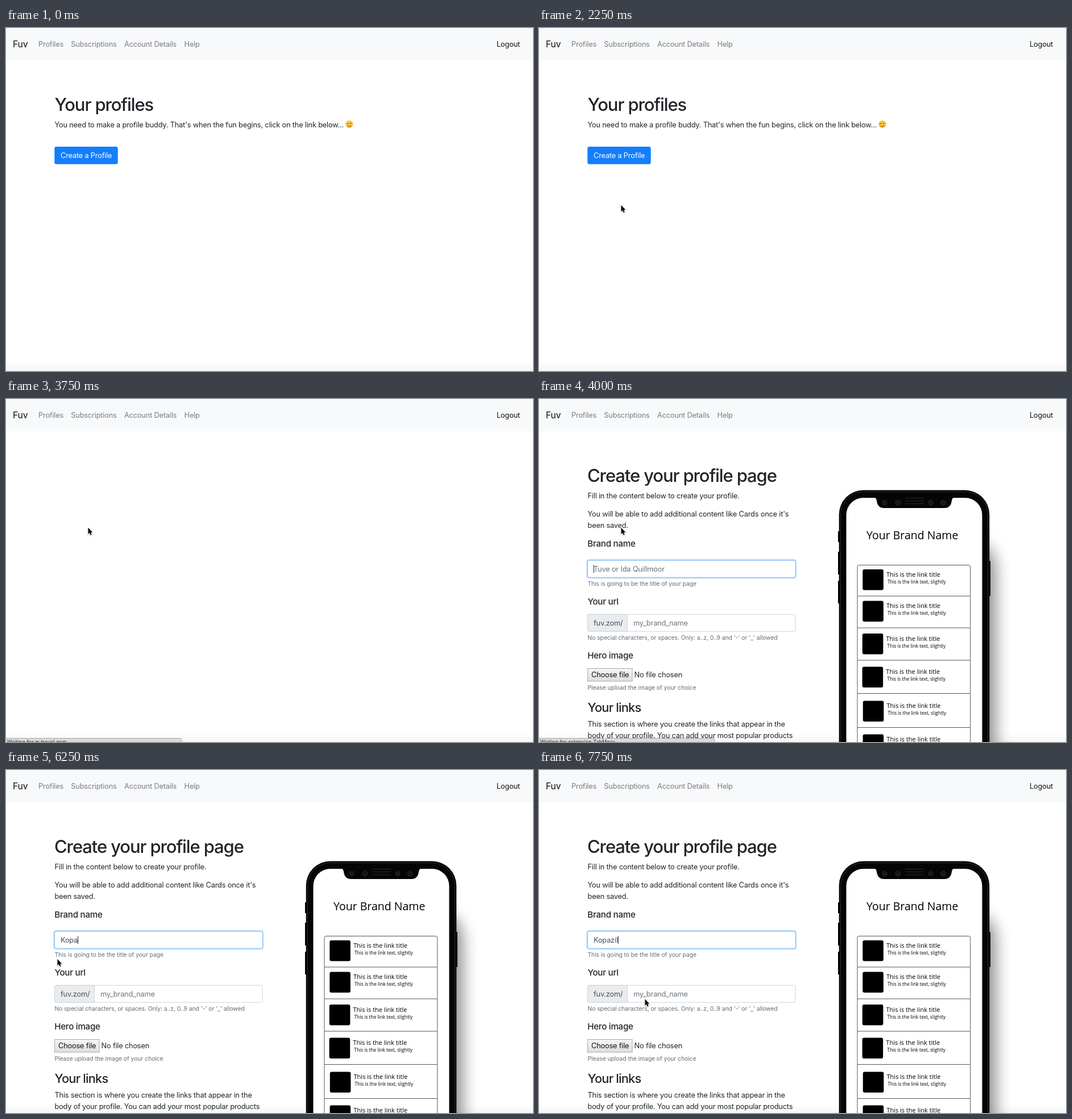
These frames come from a looping animation (927 px wide and 604 px high, 8 s). An HTML page:

```html
<!DOCTYPE html>
<html lang="en">
<head>
<meta charset="utf-8">
<title>Create a profile</title>
<style>
  html, body { margin: 0; width: 100%; height: 100%; overflow: hidden; background: #fff; }
  svg { display: block; width: 927px; height: 604px; }
  text {
    font: 12.8px Inter, sans-serif;
    font-optical-sizing: none;
    letter-spacing: -.0155em;
    fill: #212529;
    white-space: pre;
  }
  .brand { font-size: 15.8px; fill: #111; }
  .nav { fill: #7b7c7d; }
  .dark { fill: #111; }
  .h1 { font-size: 31px; font-weight: 500; letter-spacing: -.036em; }
  .h3 { font-size: 21.8px; font-weight: 500; letter-spacing: -.036em; }
  .label { font-size: 15.2px; font-weight: 500; letter-spacing: -.018em; }
  .hint { font-size: 10.35px; letter-spacing: -.006em; fill: #646c74; }
  .muted { fill: #6c757d; }
  .typed { fill: #495057; }
  .white { fill: #fff; }
  .option { font: bold 10.8px "Liberation Sans", Arial, sans-serif; letter-spacing: 0; fill: #000; }
  .status { font-size: 9.1px; letter-spacing: 0; fill: #222; }
  .mock { font: 11.03px "Open Sans", sans-serif; letter-spacing: 0; fill: #000; }
  .mock.big { font-size: 19.5px; }
  .mock.sub { font-size: 8.3px; }
</style>
</head>
<body>
<svg viewBox="0 0 927 604">
  <defs>
    <linearGradient id="foot" x1="0" y1="0" x2="0" y2="1">
      <stop stop-color="#fff"/><stop offset="1" stop-color="#f5f5f5"/>
    </linearGradient>
    <linearGradient id="grey" x1="0" y1="0" x2="0" y2="1">
      <stop stop-color="#f6f6f6"/><stop offset="1" stop-color="#dedede"/>
    </linearGradient>
    <filter id="soft" x="-30%" y="-30%" width="160%" height="160%">
      <feGaussianBlur stdDeviation="14"/>
    </filter>
    <filter id="drop" x="-60%" y="-60%" width="220%" height="220%">
      <feDropShadow dx="0" dy="1" stdDeviation=".9" flood-opacity=".35"/>
    </filter>
  </defs>

  <rect width="927" height="604" fill="#fff"/>
  <rect width="927" height="57" fill="#f8f9fa"/>
  <rect y="588" width="927" height="16" fill="url(#foot)"/>
  <text class="brand" x="12" y="34">Fuv</text>
  <text class="nav" x="57" y="33">Profiles</text>
  <text class="nav" x="114.3" y="33">Subscriptions</text>
  <text class="nav" x="208" y="33">Account Details</text>
  <text class="nav" x="313.6" y="33">Help</text>
  <text class="dark" x="863" y="33">Logout</text>

  <g id="home">
    <text class="h1" x="85.5" y="146">Your profiles</text>
    <text x="85.5" y="174.5">You need to make a profile buddy. That's when the fun begins, click on the link below...</text>
    <g fill="none" stroke="#6b4208" stroke-linecap="round">
      <circle cx="604" cy="169.5" r="6.3" fill="#fbcb3e" stroke="#e9a82a" stroke-width=".6"/>
      <path d="M600 168.6q1.4-1.5 2.8 0M600.6 172q3.4 3 6.8 0" stroke-width="1"/>
      <ellipse cx="606.4" cy="168" rx=".9" ry="1.2" fill="#6b4208" stroke="none"/>
    </g>
    <rect id="ring" x="83.5" y="207.2" width="115" height="34.4" rx="4.5" fill="#93c3fb"/>
    <rect id="button" x="85.3" y="209" width="111.4" height="30.8" rx="3.2"/>
    <text class="white" x="96" y="229">Create a Profile</text>
  </g>

  <g id="form">
    <text class="h1" x="85" y="146">Create your profile page</text>
    <text x="85.5" y="174.5">Fill in the content below to create your profile.</text>
    <text x="85.5" y="207">You will be able to add additional content like Cards once it's</text>
    <text x="85.5" y="227">been saved.</text>

    <text class="label" x="85.2" y="260">Brand name</text>
    <rect x="83.2" y="281.9" width="370" height="34.6" rx="5" fill="#bfdeff"/>
    <rect x="85.6" y="284.2" width="365.6" height="30" rx="3" fill="#fff" stroke="#80bdff"/>
    <text class="muted" id="hint" x="96" y="304">Tuve or Ida Quillmoor</text>
    <text class="typed" id="typed" x="96" y="304"></text>
    <rect id="caret" y="292.5" width="1" height="13.5" fill="#222"/>
    <text class="hint" x="85.5" y="329">This is going to be the title of your page</text>

    <text class="label" x="85.5" y="361.5">Your url</text>
    <rect x="85.6" y="379.2" width="365.4" height="30" rx="3" fill="#fff" stroke="#ced4da"/>
    <path d="M155.5 379.2H88.6a3 3 0 0 0-3 3v24a3 3 0 0 0 3 3h66.9z" fill="#e9ecef" stroke="#ced4da"/>
    <text class="typed" x="96" y="399">fuv.zom/</text>
    <text class="muted" x="166" y="399">my_brand_name</text>
    <text class="hint" x="85.5" y="424">No special characters, or spaces. Only: a..z, 0..9 and '-' or '_' allowed</text>

    <text class="label" x="85.2" y="457">Hero image</text>
    <rect x="85.5" y="474.5" width="78.5" height="22.5" fill="url(#grey)" stroke="#a9a9a9"/>
    <text class="dark" x="92" y="490">Choose file</text>
    <text x="167.6" y="490">No file chosen</text>
    <text class="hint" x="85.5" y="512">Please upload the image of your choice</text>

    <text class="h3" x="85.5" y="551">Your links</text>
    <text x="85.5" y="577">This section is where you create the links that appear in the</text>
    <text x="85.5" y="596.5">body of your profile. You can add your most popular products</text>

    <g id="phone">
      <rect x="600" y="248" width="203" height="480" rx="50" opacity=".45" filter="url(#soft)"/>
      <path d="M526 233h4v19h-4zM526 269h4v40h-4zM526 320h4v40h-4zM790 285h4v62h-4z"/>
      <rect x="527.7" y="160.5" width="264.6" height="520" rx="43" fill="#050505"/>
      <rect x="530.5" y="163.5" width="259" height="516" rx="40.5" fill="none" stroke="#333" stroke-width=".9"/>
      <rect x="540.5" y="174" width="239" height="500" rx="30" fill="#fff"/>
      <path d="M588 173q5 0 6 6 1.5 13 13 13h106q11.5 0 13-13 1-6 6-6z" fill="#050505"/>
      <g fill="#161616" stroke="#2a2a2a">
        <circle cx="608" cy="182.5" r="4"/><circle cx="631.5" cy="182.5" r="4.5"/>
        <circle cx="689" cy="182.5" r="4"/><circle cx="711" cy="182.5" r="4.5"/>
        <path d="M644 174.5h33M644 179.5h33M644 184.5h33"/>
      </g>
      <text class="mock big" x="576" y="247">Your Brand Name</text>
      <rect x="560" y="292.5" width="198.8" height="340" rx="3" fill="none" stroke="#555"/>
    </g>

    <g id="options">
      <rect x="85.5" y="315.5" width="365.5" height="59" fill="#fff" stroke="#b3bfcc"/>
      <text class="option" x="93" y="330">Kirvo Cosmetics</text>
      <text class="option" x="93" y="349.5">kpkp</text>
      <text class="option" x="93" y="369">Kirvo_Cosmetics</text>
    </g>
  </g>

  <g id="bar">
    <path d="M-1 597.5H306q2.8 0 2.8 3V606H-1z" fill="#dadada" stroke="#a8a8a8"/>
    <text class="status" id="status" x="2" y="606.8"></text>
  </g>

  <path id="cursor" d="M0 0V11.2L2.5 8.9 4.2 12.9 6.1 12.1 4.4 8.2H7.8Z"
    stroke="#fff" stroke-width="1.1" paint-order="stroke" filter="url(#drop)"/>
</svg>
<script>
const $ = id => document.getElementById(id);
const STEP = 250, LOOP = 8000, NAME = 'Kopazil';

// Each row: first step, then the value held from there on.
const pointer = [
  [4, 260, 26], [5, 243, 70], [6, 205, 148], [7, 162, 222], [8, 144.5, 261],
  [9, 144.5, 312], [11, 144.5, 282], [12, 144.5, 235], [13, 144.5, 226.5],
  [17, 139, 240], [18, 121, 278], [19, 100, 317], [20, 90.5, 333],
  [29, 112, 347], [30, 162, 386], [31, 186.5, 403.5]
];
const letters = [[0, 0], [21, 1], [23, 2], [24, 3], [25, 4], [26, 5], [27, 7]];
const messages = [
  [0, ''], [14, 'm.trovel.zom...'], [16, 'extension TabMoss...'],
  [19, 'q.trovel.zom...'], [24, '']
];
// Link rows of the phone: top line, top of the square, sideways shift.
const links = [
  [292.5, 300, 0], [347, 355.5, 0], [403, 413, -.5],
  [460, 471.5, -.7], [518.5, 531.5, .5], [578.5, 590.5, .3]
];
const held = (rows, step) => rows.filter(row => row[0] <= step).pop();
const show = (id, on) => $(id).setAttribute('visibility', on ? 'inherit' : 'hidden');

function add(tag, attrs, label = '') {
  const node = document.createElementNS($('phone').namespaceURI, tag);
  for (const key in attrs) node.setAttribute(key, attrs[key]);
  node.textContent = label;
  $('phone').append(node);
}

for (const [line, y, dx] of links) {
  if (line > 300) add('path', { d: `M560 ${line}H758`, stroke: '#555' });
  add('rect', { x: 569.3 + dx, y, width: 36.6, height: 36.6, rx: 3 });
  add('text', { class: 'mock', x: 611 + dx, y: y + 12.7 }, 'This is the link title');
  add('text', { class: 'mock sub', x: 613 + dx, y: y + 24.9 }, 'This is the link text, slightly');
}

let last = -1;
function draw(step) {
  const spot = held(pointer, step);
  show('cursor', spot);
  if (spot) $('cursor').setAttribute('transform', `translate(${spot[1]} ${spot[2]})`);

  show('home', step < 15);
  show('ring', step === 14);
  $('button').setAttribute('fill', step >= 12 ? '#0f6adb' : '#147efb');

  show('form', step >= 16);
  const count = held(letters, step)[1];
  $('typed').textContent = NAME.slice(0, count);
  show('hint', !count);
  show('options', step === 22);
  $('caret').setAttribute('x', 96 + (count ? $('typed').getComputedTextLength() : 0));

  const message = held(messages, step)[1];
  show('bar', message);
  $('status').textContent = 'Waiting for ' + message;
}

function tick() {
  const step = Math.floor(performance.now() % LOOP / STEP);
  if (step !== last) draw(last = step);
  requestAnimationFrame(tick);
}
tick();
</script>
</body>
</html>
```
